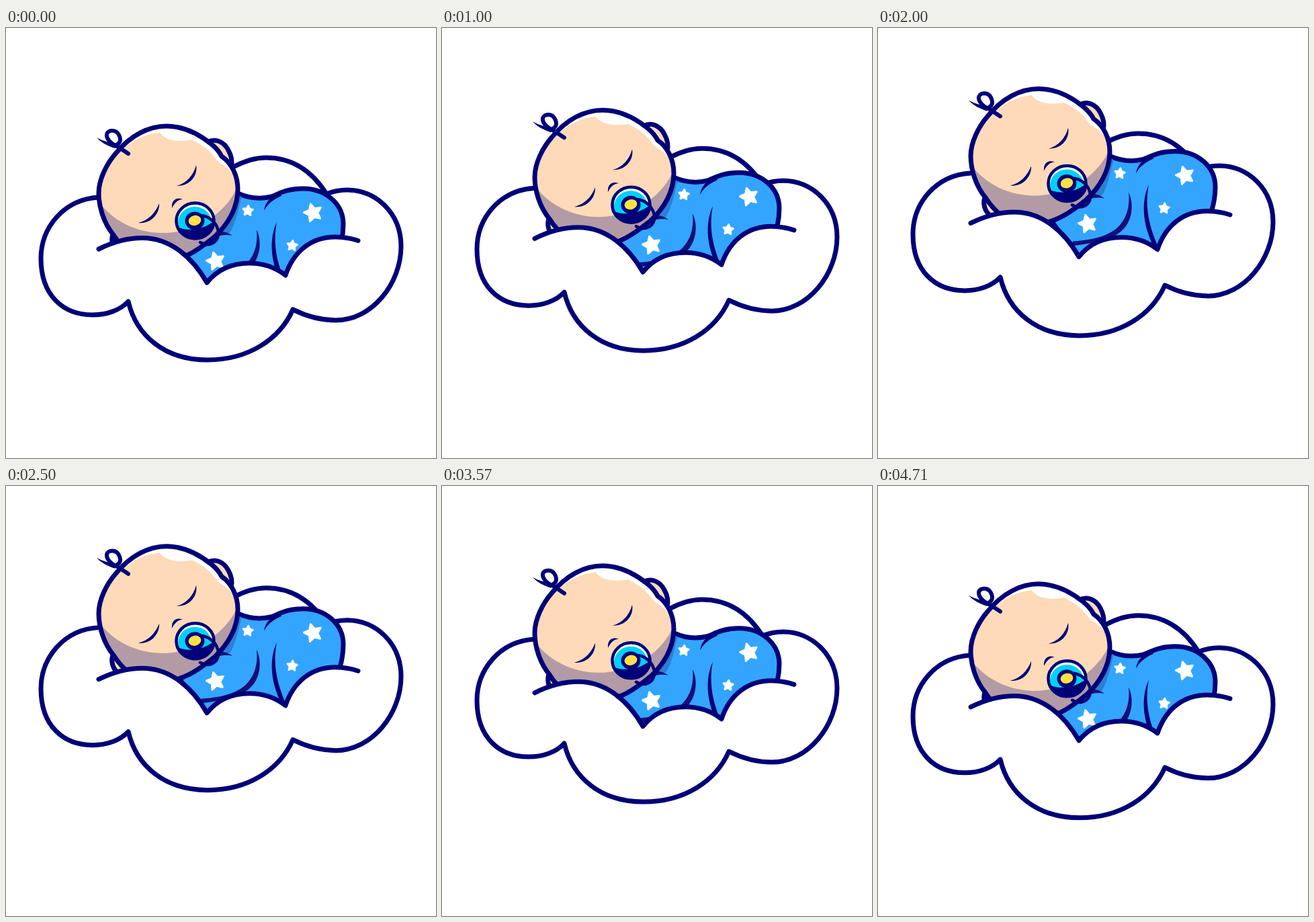
An HTML page that plays this animation: 640x640 px, repeating every 4.78 s.

```html
<!DOCTYPE html>
<html lang="en">
<head>
<meta charset="utf-8">
<title>Sleeping baby on a cloud</title>
<style>
  html, body { margin: 0; width: 100%; height: 100%; overflow: hidden; background: #fff; }
  svg { display: block; width: 100%; height: 100%; }
  .line { stroke: #000078; stroke-width: 7; stroke-linecap: round; stroke-linejoin: round; }
  .ink { fill: #000078; }
  .crease { fill: #17107a; }
  .skin { fill: #ffdab8; }
  .star { fill: #fff; stroke: #fff; stroke-width: 3; stroke-linejoin: round; }
</style>
</head>
<body>
<svg viewBox="0 0 640 640">
  <defs>
    <path id="skull" d="M239 146C268 146 290 160 306 173C312 178 318 185 321 191C336 201 345 220 345 240C345 268 330 293 310 311C292 325 268 347 225 349C195 350 172 327 160 308C145 290 138 265 138 246C138 225 150 202 163 187C185 160 212 146 239 146Z"/>
    <clipPath id="inSkull"><use href="#skull"/></clipPath>
    <clipPath id="inShield"><ellipse cx="281.5" cy="287" rx="28" ry="26.5"/></clipPath>
  </defs>

  <g id="cloud">
    <path class="line" fill="#fff" d="M138 252C85 255 52 298 52 343C52 398 85 427 129 427C150 427 170 420 182 407C194 458 236 494 300 494C360 494 407 464 427 419C445 428 465 435 491 435C545 435 588 380 588 325C588 275 550 241 508 241C497 241 487 243 477 247C455 212 425 193 387 193C370 193 355 198 338 207"/>
  </g>

  <g id="baby">
    <!-- body -->
    <path class="line" fill="#33a5ff" d="M345 246C365 255 383 254 395 251C410 245 420 239 442 239C476 239 502 262 502 292C502 306 499 325 490 345C480 385 440 400 300 400L258 343L300 300Z"/>
    <path fill="#2b80d2" d="M340 245L351 252C346 266 344 288 333 305L306 308Z"/>
    <path class="crease" d="M304 307C316 300 328 302 337 309C328 307 318 308 308 313Z"/>
    <path class="ink" d="M384 272C386 258 394 251 408 246L410 250C398 255 389 262 384 272Z"/>
    <path class="crease" d="M373 300C382 318 378 345 362 358C345 372 318 376 288 380L290 373C322 371 344 364 357 352C371 338 375 320 373 300Z"/>
    <path class="ink" d="M403 289C392 312 393 345 408 376L420 388C402 350 397 320 403 289Z"/>
    <g id="stars"></g>

    <!-- head -->
    <path class="line skin" d="M300 170C312 163 325 170 331 182C336 191 337 200 335 207"/>
    <path class="line skin" d="M162 302C155 312 157 325 165 333L185 340"/>
    <g clip-path="url(#inSkull)">
      <use href="#skull" fill="#fff"/>
      <path class="skin" d="M130 360V200L170 184C190 165 210 157 229 155.5C235 165 250 171 277 166.5C292 174 302 181 312 194C318 204 328 203 337 217L350 240V360Z"/>
      <path fill="#b29ba5" d="M138 258C160 290 200 306 235 305C285 304 328 275 345 235L350 360H130Z"/>
    </g>
    <use href="#skull" class="line" fill="none"/>

    <!-- curl -->
    <path class="line" fill="none" style="stroke-width:6" d="M182 187L167 177C155 172 149 164 150 158C152 151 164 151 168 159C172 167 170 172 162 175"/>
    <path class="ink" d="M135 163C145 169 155 170 166 173L162 179C150 175 141 170 135 163Z"/>

    <!-- face -->
    <g class="ink">
      <path d="M283 204C286 220 273 236 254 235C268 231 279 220 283 204Z"/>
      <path d="M228 261C229 277 215 292 197 290C212 286 222 276 228 261Z"/>
      <path d="M247 268C246 257 253 251 263 255C256 255 251 260 247 268Z"/>
    </g>

    <!-- pacifier -->
    <g clip-path="url(#inShield)">
      <path fill="#fff" d="M250 255h64v64h-64z"/>
      <ellipse cx="281" cy="290" rx="25" ry="24" fill="#00d0fa"/>
      <path class="ink" d="M250 293C264 304 293 303 314 284V320H250Z"/>
    </g>
    <g class="line" fill="none" style="stroke-width:4.5">
      <ellipse cx="281.5" cy="287" rx="28" ry="26.5"/>
      <path d="M287 279C302 278 315 291 316 304C317 318 304 327 289 319"/>
    </g>
    <ellipse class="ink" cx="281" cy="287" rx="14.5" ry="13.5"/>
    <ellipse cx="281" cy="286.500" rx="9.500" ry="7.500" fill="#ffe045" transform="rotate(-15 281 286.5)"/>
  </g>

  <g id="front">
    <path fill="#fff" d="M138 329C160 318 180 312.5 203 312.5C245 312.5 278 342 299 379C315 359 335 350 362 350C385 350 402 357 416 368C428 332 455 311 490 311C502 311 513 313 524 316.5L500 370L430 400L300 430L190 390Z"/>
    <path class="line" fill="none" d="M138 329C160 318 180 312.5 203 312.5C245 312.5 278 342 299 379C315 359 335 350 362 350C385 350 402 357 416 368C428 332 455 311 490 311C502 311 513 313 524 316.5"/>
  </g>
</svg>
<script>
const LOOP = 4780, FRAMES = 67;
const byId = id => document.getElementById(id);

function starPath(x, y, size, tilt) {
  const points = Array.from({ length: 10 }, (_, i) => {
    const r = i % 2 ? size * 0.5 : size;
    const a = (tilt + i * 36 - 90) * Math.PI / 180;
    return `${(x + r * Math.cos(a)).toFixed(1)},${(y + r * Math.sin(a)).toFixed(1)}`;
  });
  return `<polygon class="star" points="${points.join(" ")}"/>`;
}

byId("stars").innerHTML = [
  [457, 275, 13.5, -16],
  [360, 272, 7.5, 6],
  [426, 324, 7.5, 6],
  [312, 347, 13.5, -14]
].map(s => starPath(...s)).join("");

// Each layer rises by `lift`, reaches its top at `peak` ms, then sinks back.
const layers = [
  { node: byId("cloud"), lift: 41.5, peak: 2580 },
  { node: byId("baby"), lift: 57.7, peak: 2260 },
  { node: byId("front"), lift: 41.5, peak: 2390 }
];
const ease = u => u * u * (3 - 2 * u);

function draw(now) {
  const t = Math.floor(now % LOOP * FRAMES / LOOP) * LOOP / FRAMES;
  for (const { node, lift, peak } of layers) {
    const height = t < peak ? ease(t / peak) : ease((LOOP - t) / (LOOP - peak));
    node.setAttribute("transform", `translate(0 ${(-lift * height).toFixed(2)})`);
  }
}

const start = performance.now();
function tick() {
  draw(performance.now() - start);
  requestAnimationFrame(tick);
}
tick();
</script>
</body>
</html>
```
